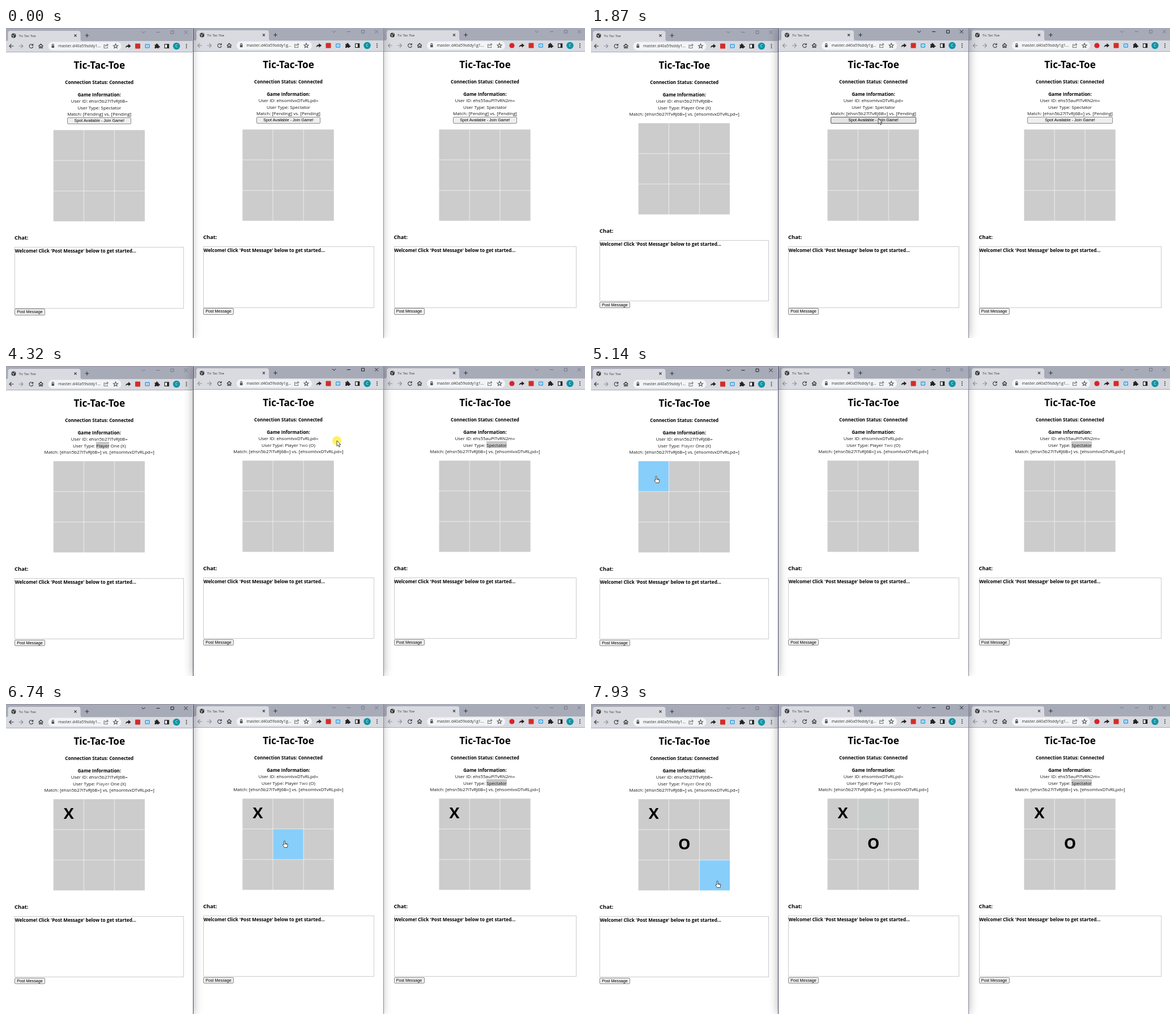
Write an HTML page that moves like this. It is 1022x548 px and loops after 8000 ms.

```html
<!DOCTYPE html>
<html lang="en">
<head>
<meta charset="utf-8">
<title>Tic Tac Toe</title>
<style>
html, body { margin: 0; width: 100%; height: 100%; overflow: hidden; background: #a7aab7; }
#stage { position: absolute; left: 0; top: 0; width: 1022px; height: 548px; overflow: hidden; }
.win { position: absolute; height: 548px; background: #fff; box-shadow: 0 0 14px rgba(0, 0, 0, .26);
  font: 8px "Open Sans", "Noto Sans", sans-serif; color: #151515; }
.win.active { box-shadow: 0 0 16px rgba(0, 0, 0, .36); }
.bar, .board { position: absolute; left: 0; top: 0; overflow: visible; }
.bar text { font-size: 7.1px; fill: #333; }
.controls { stroke: #74778a; }
.active .controls { stroke: #222; }
.line { position: absolute; left: 0; right: 0; text-align: center; line-height: 12px; white-space: pre; }
.bold { font-weight: 700; color: #000; }
.fit { display: inline-block; }
.btn { box-sizing: border-box; height: 11.5px; border: 1px solid #8a8a8a; border-radius: 2px; background: #efefef;
  font: 7.18px/11px "Liberation Sans", Arial, sans-serif; color: #000; text-align: center; white-space: pre; }
.btn.hover { background: #e3e3e3; border-color: #555; }
.board text { font: 700 27px "Open Sans", "Noto Sans", sans-serif; text-anchor: middle; }
.chat, .post { position: absolute; }
.chat { box-sizing: border-box; height: 108.5px; border: 1px solid #ccc; }
.post { width: 54px; }
.sel { padding: .6px 0; background: #c8c8c8; }
.sel.live { background: #3390ff; color: #fff; }
.faded { color: #444; }
#pointer { position: absolute; left: 0; top: 0; z-index: 9999; overflow: visible; }
</style>
</head>
<body>
<div id="stage"></div>
<script>
const LOOP = 8000, STEP = 100;
const IDS = ['ehsn5b27lTvRJ6B=', 'ehsomtvxDTvRLpd=', 'ehs55auPlTvRN2m='];
const WINDOWS = [
  { x: 0, y: 1, w: 329.5, left: 15, right: 314, nudge: -1.5, url: 'master.d40a59sddy1...' },
  { x: 331, y: 0, w: 335, left: 17, right: 319, nudge: 0, url: 'master.d40a59sddy1g...' },
  { x: 667, y: 0, w: 357, left: 17.5, right: 340, nudge: 0, url: 'master.d40a59sddy1g1...', extra: true }
];
// [time, focused window]
const FOCUS = [[0, -1], [860, 0], [1670, 1], [2500, 0], [3000, 1], [3700, 2], [4300, 1], [4700, 0], [6840, 1]];
const CLICKS = [860, 1670, 2450, 3050, 3750, 4300, 4700, 5960, 6840];
// [time, x, y] of the pointer tip
const PATH = [
  [30, 576, 463], [760, 165, 162], [960, 165, 162], [1570, 495, 162], [1670, 507, 160], [1970, 507, 160],
  [2400, 170, 141], [2550, 170, 141], [2800, 559, 143], [2900, 559, 143], [3050, 525, 141], [3400, 525, 141],
  [3700, 866, 141], [3950, 866, 141], [4200, 600, 135], [4300, 584, 132], [4420, 584, 132],
  [4700, 225, 150], [4800, 225, 150], [5040, 115, 195], [5140, 115, 195], [5440, 511, 278],
  [5760, 134.5, 198], [6100, 134.5, 198], [6640, 491.5, 242], [7000, 491.5, 242], [7150, 495, 195],
  [7630, 165, 305], [7730, 115, 318], [7830, 165, 318], [7930, 223, 313]
];

const stage = document.getElementById('stage');
const lastOf = (table, test) => table.filter(test).pop();

const icon = (x, y, d, color = '#333', extra = '') =>
  `<path transform="translate(${x} ${y})" d="${d}" fill="none" stroke="${color}" stroke-width="1.1" ${extra}/>`;

function chrome(win) {
  const { w, nudge: n } = win, y = 31;
  const fromRight = d => w - d;
  const star = fromRight(win.extra ? 153 : 136);
  const arrow = 'M4 0H-3.5M0 -3.5L-3.5 0L0 3.5';
  const back = win.x ? '#8d9099' : '#333';
  return `<svg class="bar" width="${w}" height="42">
    <rect width="${w}" height="42" fill="#a7aab7"/>
    <path d="M${2 + n} 22q3 0 3-3V8q0-4 4-4H${129 + n}q4 0 4 4V19q0 3 3 3H${w}V41H0V22Z" fill="#d9dbe1"/>
    <circle cx="${15 + n}" cy="12.5" r="4" fill="#333"/>
    ${icon(15 + n, 12.5, 'M-3 -1L0 0L-1 3M1 -3L2 -1', '#d9dbe1')}
    <text x="${24 + n}" y="14.7" style="font-size:6.1px">Tic Tac Toe</text>
    ${icon(124 + n, 12.3, 'M-2 -2L2 2M2 -2L-2 2')}
    ${icon(144.5 + n, 12.3, 'M-3.3 0H3.3M0 -3.3V3.3')}
    <g class="controls" fill="none" stroke-width="1">
      <path d="M${w - 90} 5l3 3l3-3M${w - 64} 6.5h6M${w - 38.5} 4h5v5h-5zM${w - 15} 3.5l6 6m0-6l-6 6"/>
    </g>
    ${icon(11 + n, y, arrow, back)}
    ${icon(28 + n, y, arrow, '#8d9099', `style="transform:translate(${28 + n}px,${y}px) scaleX(-1)"`)}
    ${icon(46 + n, y, 'M2.7 -2A3.4 3.4 0 1 0 3.3 1M3.2 -4V-1.3H.5')}
    ${icon(63 + n, y, 'M-4 0L0 -3.7L4 0M-2.7 -1V3.5H-.9V.8H.9V3.5H2.7V-1')}
    <rect x="${76 + n}" y="23.5" width="${star + 10 - 76 - n}" height="15" rx="7.5" fill="#f3f4f6"/>
    <rect x="${82 + n}" y="30" width="4.6" height="4" rx=".6" fill="#555"/>
    ${icon(84.3 + n, 30, 'M-1.4 0V-1.2a1.4 1.4 0 0 1 2.8 0V0', '#555')}
    <text x="${93.5 + n}" y="33.3">${win.url}</text>
    ${icon(star - 17, y, 'M-1 -2H-3.5V3.5H2.5V1M-1.5 1Q-1 -2 3.5 -2M1.5 -4L3.7 -2L1.5 0', '#666', 'opacity=".85"')}
    ${icon(star, y, 'M0 -4L1.1 -1.3L4 -1.1L1.8 .7L2.5 3.6L0 2L-2.5 3.6L-1.8 .7L-4 -1.1L-1.1 -1.3Z', '#555')}
    ${win.extra ? `<circle cx="${fromRight(131)}" cy="${y}" r="4.6" fill="#d8232a"/>` : ''}
    <path transform="translate(${fromRight(114)} ${y})" d="M-4.5 3Q-4 -1.5 .5 -1.5V-4L5 0L.5 3.5V1Q-3 1 -4.5 3Z" fill="#222"/>
    <rect x="${fromRight(101.5)}" y="26.5" width="9" height="9" rx="1" fill="#d32d27"/>
    <rect x="${fromRight(84)}" y="27.5" width="8" height="7" rx="1" fill="#2d9be0"/>
    <rect x="${fromRight(82.5)}" y="29" width="5" height="4" fill="#eaf5fc"/>
    <circle cx="${fromRight(80)}" cy="31" r="1.1" fill="#2d9be0"/>
    <path transform="translate(${fromRight(63)} ${y})" d="M-4 -2.5H-1.5a1.4 1.4 0 1 1 2.6 0H3V0a1.4 1.4 0 1 1 0 2.2V4H.9a1.3 1.3 0 0 0-2.5 0H-4V1.7a1.4 1.4 0 0 0 0-2.5Z" fill="#222"/>
    <rect x="${fromRight(49.3)}" y="27.8" width="7" height="6.6" fill="#fff" stroke="#222" stroke-width="1.2"/>
    <rect x="${fromRight(45.3)}" y="27.8" width="3" height="6.6" fill="#222"/>
    <circle cx="${fromRight(28.5)}" cy="${y}" r="6.2" fill="#0d93a4"/>
    <text x="${fromRight(28.5)}" y="33.3" text-anchor="middle" style="font-size:6.5px;fill:#fff">C</text>
    ${[-3, 0, 3].map(d => `<circle cx="${fromRight(11)}" cy="${y + d}" r=".9" fill="#333"/>`).join('')}
    <path d="M${Math.ceil(w) + .5} 0V548" stroke="${win.x ? '#8488a2' : '#454a6b'}"/>
  </svg>`;
}

const line = (top, html, style = '', cls = '') =>
  `<div class="line ${cls}" style="top:${top}px;${style}">${html}</div>`;

// Text selection: blue in the focused window, grey elsewhere.
function mark(word, from, to, t, focused) {
  if (t < from) return word;
  return `<span class="${t >= to ? 'faded' : focused ? 'sel live' : 'sel'}">${word}</span>`;
}

function userType(i, t, focused) {
  if (i === 0 && t >= 860) return mark('Player', 2500, 4700, t, focused) + ' One (X)';
  if (i === 1 && t >= 1970) return 'Player ' + mark('Two', 3100, 4300, t, focused) + ' (O)';
  return i === 2 ? mark('Spectator', 3800, LOOP, t, focused) : 'Spectator';
}

const hasButton = (i, t) => t < (i ? 1970 : 860);
const boardTop = (i, t) => hasButton(i, t) ? 179.5 : 167.3;

function pieceAt(i, cell, t) {
  if (cell === 0 && t >= (i ? 6060 : 5960)) return 'X';
  if (cell === 4 && t >= (i === 1 ? 6840 : 6940)) return 'O';
  return '';
}

function hoveredCell(i, t, tip) {
  const turn = t < 1970 ? -1 : t >= 5960 && t < 6840 ? 1 : 0;
  if (!tip || i !== turn) return -1;
  const win = WINDOWS[i];
  const col = Math.floor((tip.x - win.x - win.w / 2 + 81) / 54);
  const row = Math.floor((tip.y - win.y - boardTop(i, t)) / 54);
  const inside = col >= 0 && col < 3 && row >= 0 && row < 3;
  const cell = row * 3 + col;
  return inside && !pieceAt(i, cell, t) ? cell : -1;
}

// SVG keeps the thin grid lines at fractional positions.
function board(i, t, tip) {
  const hover = hoveredCell(i, t, tip);
  const cells = Array.from({ length: 9 }, (_, c) => {
    const x = c % 3 * 54, y = Math.floor(c / 3) * 54;
    const tint = c === hover ? '#87cefa' : i === 1 && c === 1 && t >= 7150 ? '#c8cccb' : '#ccc';
    return `<rect x="${x}" y="${y}" width="53.2" height="53.2" fill="${tint}"/>
      <text x="${x + 27}" y="${y + 35}">${pieceAt(i, c, t)}</text>`;
  });
  return `<svg class="board" width="1" height="1">
    <g transform="translate(${WINDOWS[i].w / 2 - 81} ${boardTop(i, t)})">
      <rect width="161" height="161" fill="#f6f6f6"/>${cells.join('')}
    </g></svg>`;
}

function page(i, t, tip, focused) {
  const win = WINDOWS[i], shift = boardTop(i, t) - 179.5;
  const one = t >= (i ? 960 : 860) ? IDS[0] : 'Pending';
  const two = t >= (i ? 1970 : 1770) ? IDS[1] : 'Pending';
  const over = tip && Math.abs(tip.x - win.x - win.w / 2) < 57 && tip.y > 157 && tip.y < 170;
  const button = hasButton(i, t) ? `<div class="btn${over ? ' hover' : ''}">Spot Available - Join Game!</div>` : '';
  const start = `text-align:left;left:${win.left}px;`;
  return line(52.5, 'Tic-Tac-Toe', 'font-size:17.1px;line-height:24px', 'bold')
    + line(88.5, 'Connection Status: Connected', 'font-size:8.06px', 'bold')
    + line(111, 'Game Information:', 'font-size:8.06px', 'bold')
    + line(121.8, 'User ID: ' + IDS[i])
    + line(133.5, 'User Type: ' + userType(i, t, focused))
    + line(145, `<div class="fit">Match: [${one}] vs. [${two}]${button}</div>`)
    + board(i, t, tip)
    + line(364.2 + shift, 'Chat:', start + 'font-size:9.4px', 'bold')
    + `<div class="chat" style="left:${win.left}px;width:${win.right - win.left}px;top:${386 + shift}px"></div>`
    + line(386.8 + shift, "Welcome! Click 'Post Message' below to get started...", start + 'padding-left:.7px;font-size:8.2px', 'bold')
    + `<div class="btn post" style="left:${win.left}px;top:${495 + shift}px">Post Message</div>`;
}

function pointerAt(t) {
  const next = PATH.findIndex(p => p[0] > t);
  if (next === 0) return null;
  const a = PATH[(next < 0 ? PATH.length : next) - 1], b = next < 0 ? a : PATH[next];
  const k = b === a ? 0 : Math.floor((t - a[0]) / STEP) * STEP / (b[0] - a[0]);
  return { x: a[1] + (b[1] - a[1]) * k, y: a[2] + (b[2] - a[2]) * k };
}

const panes = WINDOWS.map(win => {
  const el = document.createElement('div');
  el.style.cssText = `left:${win.x}px;top:${win.y}px;width:${win.w}px`;
  el.innerHTML = chrome(win) + '<div></div>';
  stage.append(el);
  return { el, body: el.lastChild, html: '' };
});

stage.insertAdjacentHTML('beforeend', `<svg id="pointer" width="1" height="1">
  <circle r="8" fill="#fff04a" fill-opacity=".85"/>
  <path d="M0 0V9.6L2.3 7.6L3.9 11.2L5.5 10.5L3.9 7H7Z" fill="#fff" stroke="#222" stroke-width=".8"/>
  <path d="M-1 1a1.1 1.1 0 0 1 2.2 0V4.5L4.9 5.2Q6 5.6 5.9 6.8L5 11.5H-.2L-3.2 7.4Q-3.4 5.8-1 7ZM1.2 4.5V6.3M2.9 5V6.6M4.4 5.3V6.8" fill="#fff" stroke="#222" stroke-width=".8"/>
</svg>`);
const pointer = document.getElementById('pointer');
const [ring, arrow, hand] = pointer.children;
const show = (el, on) => { el.style.display = on ? '' : 'none'; };

function render(t) {
  const tip = pointerAt(t), focus = lastOf(FOCUS, row => row[0] <= t)[1];
  panes.forEach((pane, i) => {
    // Windows stack by how recently they were focused.
    const raised = lastOf(FOCUS, row => row[0] <= t && row[1] === i);
    pane.el.style.zIndex = raised ? raised[0] : 3 - i;
    pane.el.className = i === focus ? 'win active' : 'win';
    const html = page(i, t, tip, i === focus);
    if (html !== pane.html) pane.body.innerHTML = pane.html = html;
  });
  show(pointer, tip);
  if (!tip) return;
  const overCell = panes.some((_, i) => hoveredCell(i, t, tip) >= 0);
  show(ring, CLICKS.some(c => t >= c && t < c + STEP));
  show(arrow, !overCell);
  show(hand, overCell);
  pointer.style.transform = `translate(${tip.x}px, ${tip.y}px)`;
}

const began = performance.now();
function tick() {
  render((performance.now() - began) % LOOP);
  requestAnimationFrame(tick);
}
tick();
</script>
</body>
</html>
```
